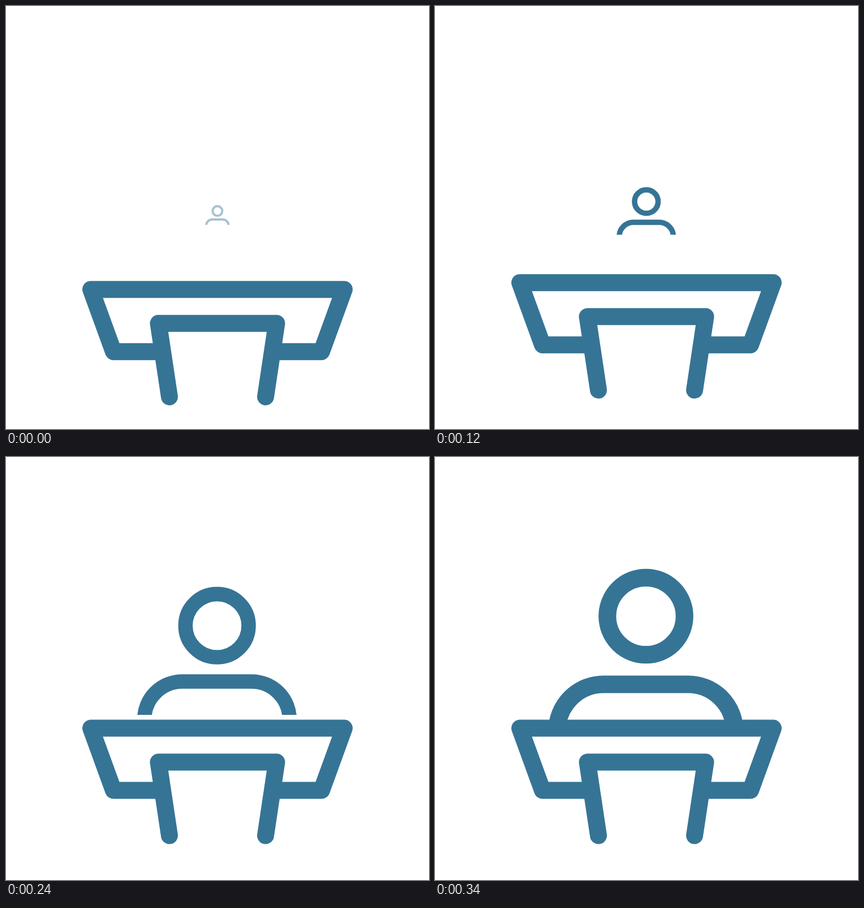
These frames come from a looping animation (748x748 px, 4.72 s). An HTML page:

```html
<!DOCTYPE html>
<html lang="en">
<head>
<meta charset="utf-8">
<title>Speaker at a lectern</title>
<style>
  html, body { margin: 0; width: 100%; height: 100%; overflow: hidden; background: #fff; }
  svg { display: block; width: 100%; height: 100%; }
</style>
</head>
<body>
<svg viewBox="0 0 748 748" fill="none" stroke="#367495">
  <clipPath id="waist"><rect x="-200" y="0" width="400" height="100"/></clipPath>
  <g id="person" stroke-width="31.2">
    <circle cx="-1" cy="-92.5" r="68.2"/>
    <path clip-path="url(#waist)" d="M-158 110a82 82 0 0 1 82-82H73.6a82 82 0 0 1 82 82"/>
  </g>
  <g id="desk" stroke-width="30" stroke-linecap="round" stroke-linejoin="round">
    <path d="M274 589.5H190L150 479.5H598L558 589.5H474"/>
    <path d="M289 669.5L269.5 539.5H478.5L459 669.5"/>
  </g>
</svg>
<script>
  const LOOP = 4720, STEP = 20;
  const person = document.getElementById('person');
  const desk = document.getElementById('desk');

  const mix = (a, b, p) => a + (b - a) * p;
  const progress = (t, from, to) => Math.min(1, (t - from) / (to - from));

  // Slow growth, fast growth past full size, then settling back
  function scaleAt(t) {
    if (t < 200) return mix(.125, .5625, progress(t, 0, 200) ** 1.74);
    if (t < 280) return mix(.5625, 1.105, progress(t, 200, 280) ** 1.08);
    return mix(1.105, 1, progress(t, 280, 340));
  }

  const deskDrop = t => 10.85 * (1 + Math.cos(Math.PI * progress(t, -8, 232)));

  function draw(now) {
    const t = Math.floor(now % LOOP / STEP) * STEP;
    person.setAttribute('transform', `translate(374 374) scale(${scaleAt(t)})`);
    person.setAttribute('opacity', mix(.45, 1, progress(t, 0, 120)));
    desk.setAttribute('transform', `translate(0 ${deskDrop(t)})`);
  }

  let start;
  function tick(now) {
    start ??= now;
    draw(now - start);
    requestAnimationFrame(tick);
  }
  draw(0);
  requestAnimationFrame(tick);
</script>
</body>
</html>
```
